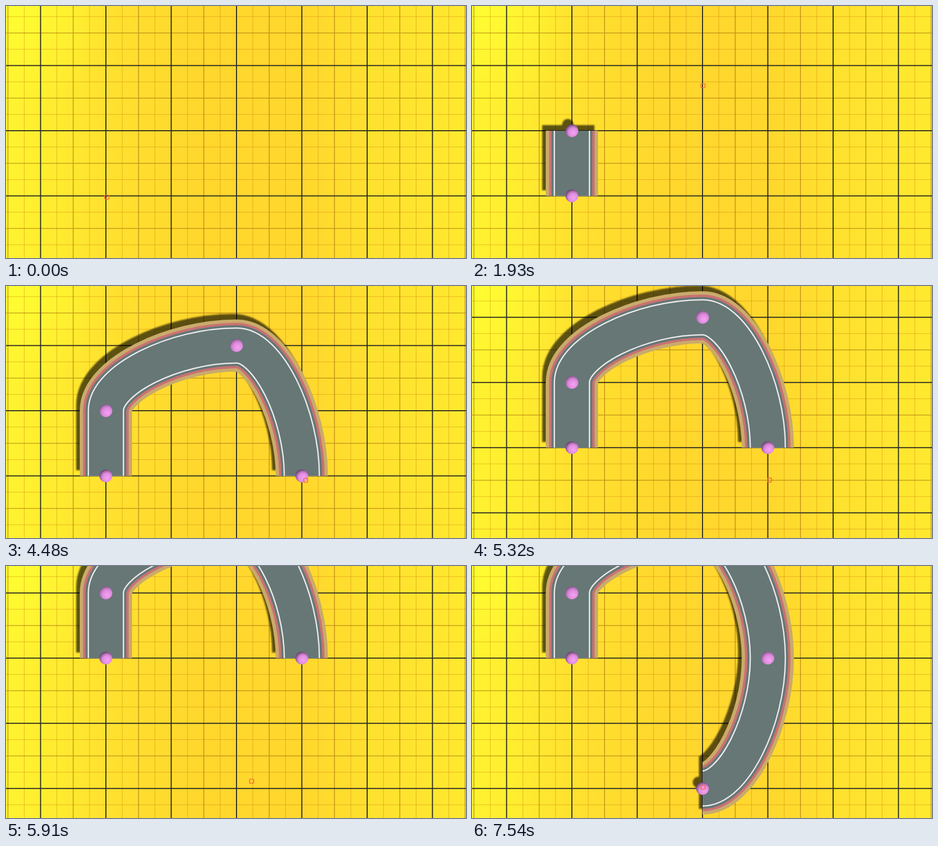
An HTML page with a canvas that plays this animation: 898x493 px, repeating every 8000 ms.

```html
<!DOCTYPE html>
<html lang="en">
<head>
<meta charset="utf-8">
<title>Road editor</title>
<style>
  html, body { margin: 0; width: 100%; height: 100%; overflow: hidden; background: #ffdc2e; }
  canvas { display: block; }
</style>
</head>
<body>
<canvas id="stage" width="898" height="493"></canvas>
<script>
const W = 898, H = 493, LOOP = 8000;
const CELL = 127.5, ORIGIN = { x: 195, y: 371.5 };
const SCROLL = 1.5 * CELL;
const HANDLE = 0.475;
const ctx = document.getElementById('stage').getContext('2d');
const shade = document.createElement('canvas');
shade.width = W + 40;
shade.height = H + 40;
const sctx = shade.getContext('2d');

// Grid cell of each node, and its heading in degrees from a given time on.
const nodes = [
  { col: 0, row: 0, turns: [[450, -90]] },
  { col: 0, row: -1, turns: [[1620, -90]] },
  { col: 2, row: -2, turns: [[2590, -15], [2920, 0]] },
  { col: 3, row: 0, turns: [[4150, 75], [4480, 90]] },
  { col: 2, row: 2, turns: [[6700, 120], [6980, 135], [7210, 150], [7390, 165], [7540, 180]] }
];

// time, x, y
const pointer = [
  [0, 197, 374], [640, 197, 374], [950, 172, 290], [1180, 190, 202], [1390, 213, 236],
  [1640, 213, 236], [1930, 451, 156], [2030, 451, 156], [2280, 465, 109], [2440, 456, 118],
  [3170, 456, 118], [3760, 590, 366], [3970, 585, 380], [5270, 585, 380], [5450, 564, 378],
  [6110, 456, 433], [6240, 456, 433], [6290, 451, 433], [LOOP, 451, 433]
];

const clamp = v => Math.min(1, Math.max(0, v));
const smooth = p => p * p * (3 - 2 * p);

function pointerAt(t) {
  const i = Math.max(1, pointer.findIndex(k => k[0] > t));
  const [t0, x0, y0] = pointer[i - 1], [t1, x1, y1] = pointer[i];
  const p = smooth(clamp((t - t0) / (t1 - t0)));
  return { x: x0 + (x1 - x0) * p, y: y0 + (y1 - y0) * p };
}

function scrollAt(t) {
  const left = 1 - clamp((t - 5270) / 325);
  return SCROLL * (1 - left * left);
}

function nodesAt(t, scroll) {
  return nodes.filter(n => t >= n.turns[0][0]).map(n => {
    const angle = n.turns.filter(k => t >= k[0]).pop()[1] * Math.PI / 180;
    return {
      x: ORIGIN.x + n.col * CELL,
      y: ORIGIN.y + n.row * CELL - scroll,
      dx: Math.cos(angle),
      dy: Math.sin(angle)
    };
  });
}

function roadPath(list) {
  const path = new Path2D();
  list.forEach((b, i) => {
    if (!i) return path.moveTo(b.x, b.y);
    const a = list[i - 1], vx = b.x - a.x, vy = b.y - a.y;
    const la = HANDLE * (vx * a.dx + vy * a.dy);
    const lb = HANDLE * (vx * b.dx + vy * b.dy);
    path.bezierCurveTo(a.x + a.dx * la, a.y + a.dy * la,
      b.x - b.dx * lb, b.y - b.dy * lb, b.x, b.y);
  });
  return path;
}

function fillStage(gradient, stops) {
  stops.forEach(([at, color]) => gradient.addColorStop(at, color));
  ctx.fillStyle = gradient;
  ctx.fillRect(0, 0, W, H);
}

function drawGround() {
  fillStage(ctx.createLinearGradient(0, 0, W, 0), [
    [0, '#fff330'], [0.1, '#ffec30'], [0.22, '#ffe12f'], [0.42, '#ffd72d'],
    [0.64, '#ffd72d'], [0.8, '#ffe12f'], [1, '#ffe92f']
  ]);
  fillStage(ctx.createRadialGradient(0, 0, 0, 0, 0, 210), [
    [0, 'rgba(255,255,50,.9)'], [1, 'rgba(255,250,50,0)']
  ]);
}

function drawLines(step, skip, scroll, color, width) {
  ctx.strokeStyle = color;
  ctx.lineWidth = width;
  ctx.beginPath();
  for (let i = -30; i < 40; i++) {
    if (skip && i % skip === 0) continue;
    const x = ORIGIN.x + i * step, y = ORIGIN.y + i * step - scroll;
    if (x > -2 && x < W + 2) { ctx.moveTo(x, 0); ctx.lineTo(x, H); }
    if (y > -2 && y < H + 2) { ctx.moveTo(0, y); ctx.lineTo(W, y); }
  }
  ctx.stroke();
}

function drawGrid(scroll) {
  drawLines(CELL / 4, 2, scroll, 'rgba(190,105,0,.42)', 1);
  drawLines(CELL / 2, 2, scroll, 'rgba(140,80,0,.5)', 1.6);
  drawLines(CELL, 0, scroll, '#2b2a22', 2);
}

function drawShadow(list, path) {
  sctx.setTransform(1, 0, 0, 1, 0, 0);
  sctx.clearRect(0, 0, shade.width, shade.height);
  sctx.translate(13, 9);
  sctx.lineWidth = 102;
  sctx.stroke(path);
  for (const n of list) {
    sctx.beginPath();
    sctx.arc(n.x - 1, n.y - 1, 11, 0, 7);
    sctx.fill();
  }
  ctx.save();
  ctx.globalAlpha = 0.64;
  ctx.filter = 'blur(1.6px)';
  ctx.drawImage(shade, -20, -20);
  ctx.restore();
}

function drawRoad(path) {
  const layers = [[102, '#c9ab6b'], [89, '#c97272'], [79.5, '#667776'], [71, '#ececec'], [66, '#667776']];
  for (const [width, color] of layers) {
    ctx.lineWidth = width;
    ctx.strokeStyle = color;
    ctx.stroke(path);
  }
}

function drawNode(n, isEnd) {
  const g = ctx.createRadialGradient(n.x + 3, n.y + 4, 1, n.x + 2, n.y + 3, 17);
  g.addColorStop(0, '#f4a0f2');
  g.addColorStop(0.5, '#de8bdd');
  g.addColorStop(0.72, isEnd ? '#a768a9' : '#bd77be');
  g.addColorStop(1, isEnd ? '#493050' : '#74477a');
  ctx.fillStyle = g;
  ctx.beginPath();
  ctx.arc(n.x, n.y, 12.5, 0, 7);
  ctx.fill();
}

function drawPointer({ x, y }) {
  ctx.strokeStyle = '#ff6540';
  ctx.lineWidth = 1.6;
  ctx.beginPath();
  ctx.roundRect(x - 4, y - 4, 8, 8, 2);
  ctx.stroke();
}

function draw(t) {
  const scroll = scrollAt(t);
  const list = nodesAt(t, scroll);
  const path = roadPath(list);
  drawGround();
  drawGrid(scroll);
  drawShadow(list, path);
  drawRoad(path);
  list.forEach((n, i) => drawNode(n, i === 0 || i === list.length - 1));
  drawPointer(pointerAt(t));
}

const start = performance.now();
function tick() {
  draw((performance.now() - start) % LOOP);
  requestAnimationFrame(tick);
}
tick();
</script>
</body>
</html>
```
